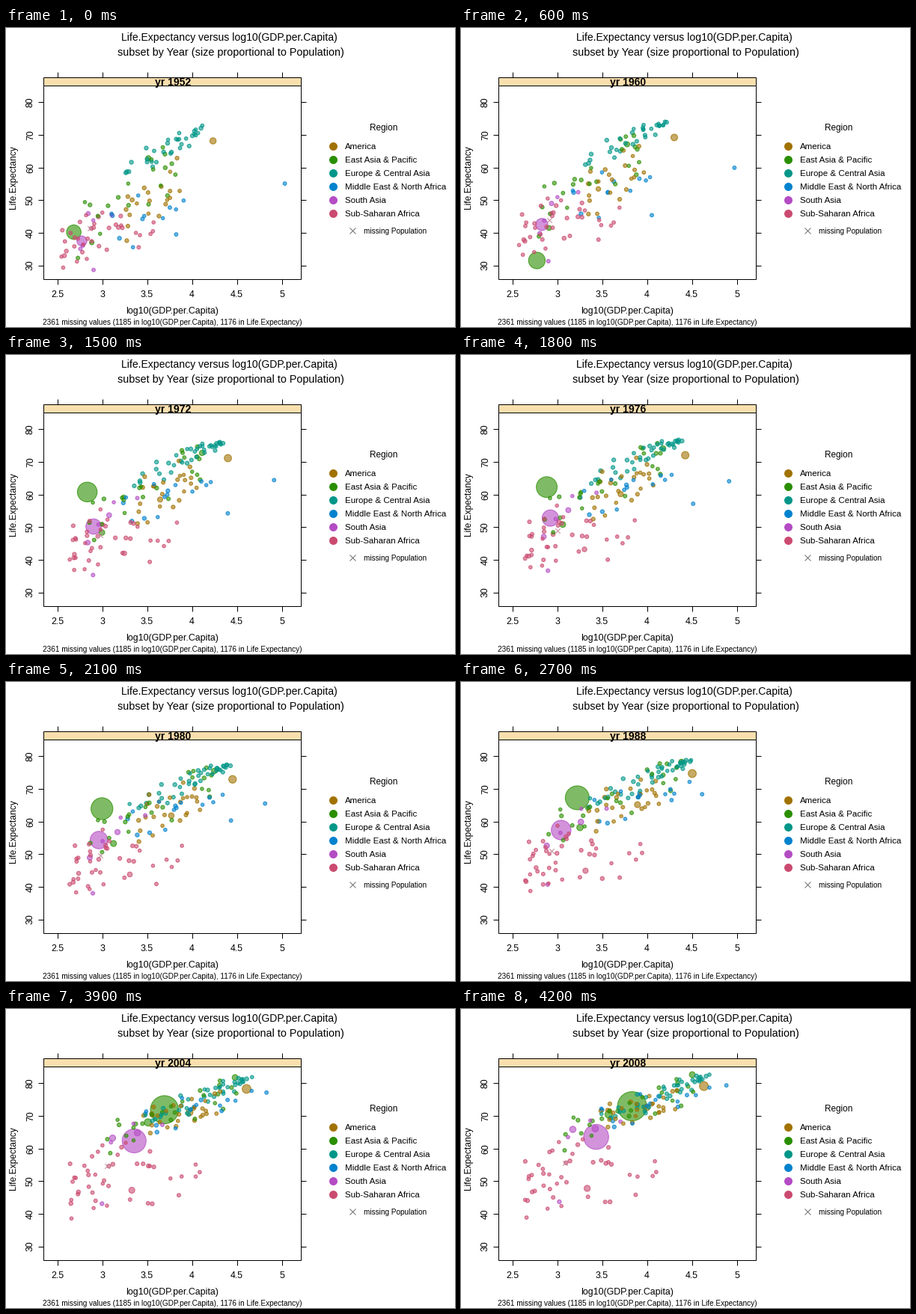
Recreate the animation shown at these times as a matplotlib script. Size 600 by 400 pixels, loop 4.5 s.

```python
import numpy as np
import matplotlib.pyplot as plt
from matplotlib.animation import FuncAnimation
from matplotlib.colors import to_rgba
from matplotlib.patches import Rectangle

W, H, DPI = 600, 400, 100
FRAMES, STEP = 15, 300
PT = 72 / DPI  # points per pixel
FIRST, LAST = 1952, 2008

AMERICA, EAST, EUROPE, MIDDLE, SOUTH, AFRICA = range(6)
REGIONS = [
    ("America", "#a17200"),
    ("East Asia & Pacific", "#2a8f00"),
    ("Europe & Central Asia", "#009688"),
    ("Middle East & North Africa", "#0082ce"),
    ("South Asia", "#b44cc4"),
    ("Sub-Saharan Africa", "#cb4b70"),
]

plt.rcParams["font.family"] = "Liberation Sans"
fig = plt.figure(figsize=(W / DPI, H / DPI), dpi=DPI, facecolor="white")
ax = fig.add_axes([0, 0, 1, 1])
ax.set_xlim(0, W)
ax.set_ylim(H, 0)
ax.axis("off")

rng = np.random.default_rng(12)
countries = []  # (region, function of year giving log income, life, radius)


def px(income):
    return 69 + 120 * (income - 2.5)


def py(life):
    return 318 - 4.36 * (life - 30)


def mix(pair, t):
    return pair[0] + (pair[1] - pair[0]) * t


def path(year, points):
    years, incomes, lives = zip(*points)
    return np.interp(year, years, incomes), np.interp(year, years, lives)


def track(region, radius, *points):
    """Large or unusual country led through (year, income, life) points."""
    def at(year):
        t = (year - FIRST) / (LAST - FIRST)
        return *path(year, points), mix(radius, t)
    countries.append((region, at))


def below_frontier(life, t):
    """Flatten life expectancy softly under the best level of its time."""
    top = 73.5 + 9.5 * t ** 1.2
    return top - 1.5 * np.log1p(np.exp((top - life) / 1.5))


def cloud(region, count, income, spread, life, slope, noise, skew=0):
    """Countries strung along a regional trend; pairs run first to last year."""
    ranks = np.linspace(-1.6, 1.6, count) + rng.normal(0, 0.2, count)
    for z in ranks:
        z += skew * (z * z - 1)
        luck = np.clip(rng.normal(), -1.8, 1.8)
        phase, radius = rng.uniform(0, 2 * np.pi), rng.uniform(2.2, 2.7)
        born = rng.choice([FIRST, rng.integers(FIRST, 1995)], p=[0.75, 0.25])

        def at(year, z=z, luck=luck, phase=phase, radius=radius, born=born):
            if year < born:
                return None
            t = (year - FIRST) / (LAST - FIRST)
            wave = np.sin(phase + 6 * t)
            offset = mix(spread, t) * (z + 0.12 * wave)
            gain = t ** 0.65
            level = (mix(life, gain) + mix(slope, gain) * offset
                     + mix(noise, t) * (luck + 0.2 * wave))
            return mix(income, t ** 0.8) + offset, below_frontier(level, t), radius
        countries.append((region, at))


track(EAST, (9.7, 19.5), (1952, 2.68, 40.3), (1956, 2.72, 46), (1960, 2.77, 31.6),
      (1964, 2.75, 53), (1968, 2.78, 59.4), (1976, 2.88, 62.4),
      (1988, 3.22, 67.4), (1996, 3.41, 69.9), (2008, 3.83, 73.1))
track(SOUTH, (6.7, 16.7), (1952, 2.77, 37.6), (1968, 2.88, 47.7),
      (1976, 2.92, 52.9), (1988, 3.04, 57.5), (2008, 3.43, 63.7))
track(AMERICA, (4.2, 6), (1952, 4.23, 68.3), (1968, 4.37, 70.4), (2008, 4.63, 79.3))
track(EAST, (3.4, 3.9), (1952, 3.51, 63), (1968, 4.04, 71.5),
      (1988, 4.38, 78.4), (2008, 4.5, 82.8))
track(EAST, (3, 5), (1952, 2.88, 37.1), (1968, 2.93, 46), (2008, 3.57, 70.6))
track(AMERICA, (2.8, 4.6), (1952, 3.33, 50.2), (1988, 3.89, 65.3), (2008, 3.99, 72.7))
track(SOUTH, (2.7, 4.3), (1952, 2.84, 46), (1988, 3.26, 60), (2008, 3.42, 66.2))
track(SOUTH, (2.6, 4.2), (1952, 2.78, 36.2), (1988, 2.88, 52.7), (2008, 3.17, 66))
track(SOUTH, (2.4, 2.6), (1952, 2.9, 28.7), (1988, 2.89, 40.8), (2008, 3.02, 43.8))
track(AFRICA, (2.5, 4.1), (1952, 2.96, 36), (1976, 3.3, 43.3), (2008, 3.33, 47.9))
track(MIDDLE, (2.4, 2.4), (1952, 5.03, 55.2), (1968, 4.91, 64.9),
      (1976, 4.91, 64.2), (1988, 4.61, 68.5), (2008, 4.88, 79.5))
track(MIDDLE, (2.4, 2.4), (1952, 3.82, 39.6), (1976, 4.51, 57.3),
      (1988, 4.27, 66.7), (2008, 4.34, 72.9))

cloud(AMERICA, 28, (3.53, 3.9), (0.22, 0.28), (51.5, 73), (30, 9), (5, 2.6))
cloud(EAST, 25, (3.3, 3.82), (0.38, 0.5), (52, 72.3), (20, 11), (4.5, 2.6))
cloud(EUROPE, 41, (3.72, 4.18), (0.28, 0.36), (66, 77), (15, 12), (2, 1.8), -0.2)
cloud(MIDDLE, 14, (3.45, 4), (0.24, 0.36), (45, 73.5), (12, 8), (4, 2.2))
cloud(SOUTH, 3, (2.95, 3.45), (0.12, 0.2), (45, 69), (40, 12), (3, 2))
cloud(AFRICA, 44, (2.92, 3.17), (0.28, 0.4), (39.5, 53), (6, 4), (4, 6), 0.22)


def text(x, y, s, size, ha="center", **kw):
    kw.setdefault("va", "baseline")
    return ax.text(x, y, s, fontsize=size * PT, ha=ha, color="black", **kw)


def line(x0, y0, x1, y1):
    ax.plot([x0, x1], [y0, y1], color="black", lw=PT, zorder=4,
            solid_capstyle="butt")


def draw_panel():
    left, right, top, strip, bottom = 49.5, 393.5, 65.5, 76.5, 335.5
    for y, h, fill in ((top, strip - top, "#fadfae"),
                       (strip, bottom - strip, "none")):
        ax.add_patch(Rectangle((left, y), right - left, h, fc=fill,
                               ec="black", lw=PT, zorder=3))
    for i in range(6):
        x, y = px(2.5 + i / 2) - 0.5, py(30 + 10 * i) - 0.5
        line(x, bottom, x, bottom + 7)
        line(x, top, x, top - 7)
        line(left, y, left - 7, y)
        line(right, y, right + 7, y)
        text(x, 360.5, f"{2.5 + i / 2:g}", 12.4)
        text(33, y, str(30 + 10 * i), 12.4, rotation=90, va="center")


def draw_labels():
    text(298.5, 17.5, "Life.Expectancy versus log10(GDP.per.Capita)", 14)
    text(300.5, 37, "subset by Year (size proportional to Population)", 14.4)
    text(222, 382, "log10(GDP.per.Capita)", 12.4)
    text(10, 200, "Life.Expectancy", 12, rotation=90, va="center")
    text(222, 397, "2361 missing values (1185 in log10(GDP.per.Capita), "
         "1176 in Life.Expectancy)", 10)
    text(505, 137, "Region", 11.8)
    for i, (name, color) in enumerate(REGIONS):
        y = 157.5 + 18 * i
        ax.scatter(436.5, y, s=(11 * PT) ** 2, c=color, lw=0)
        text(453, y + 4, name, 11.5, ha="left")
    ax.scatter(462.5, 271, s=(8 * PT) ** 2, c="#707070", marker="x", lw=PT)
    text(477.5, 275, "missing Population", 10, ha="left")


draw_panel()
draw_labels()
title = text(223.5, 76.5, "", 14, weight="bold", zorder=6)
bubbles = ax.scatter([], [], lw=1.1 * PT, zorder=2)
cross = ax.scatter([], [], s=(6.5 * PT) ** 2, marker="x", lw=PT,
                   c="#c08a9a", zorder=2)
cross_points = [(1952, 2.86, 41.5), (1976, 3, 49), (1988, 2.93, 51), (2008, 3.08, 55.8)]


def update(i):
    year = FIRST + 4 * i
    title.set_text(f"yr {year}")
    dots = [(spot, REGIONS[region][1]) for region, at in countries
            if (spot := at(year))]
    dots.sort(key=lambda dot: -dot[0][2])  # small dots on top
    income, life, radius = np.array([spot for spot, _ in dots]).T
    bubbles.set_offsets(np.column_stack([px(income), py(life)]))
    bubbles.set_sizes((2 * radius * PT) ** 2)
    bubbles.set_facecolor([to_rgba(c, 0.6) for _, c in dots])
    bubbles.set_edgecolor([to_rgba(c, 0.75) for _, c in dots])
    x, y = path(year, cross_points)
    cross.set_offsets([[px(x), py(y)]])
    return bubbles, cross, title


anim = FuncAnimation(fig, update, frames=FRAMES, interval=STEP,
                     repeat=True, repeat_delay=0, blit=False)
plt.show()
```
